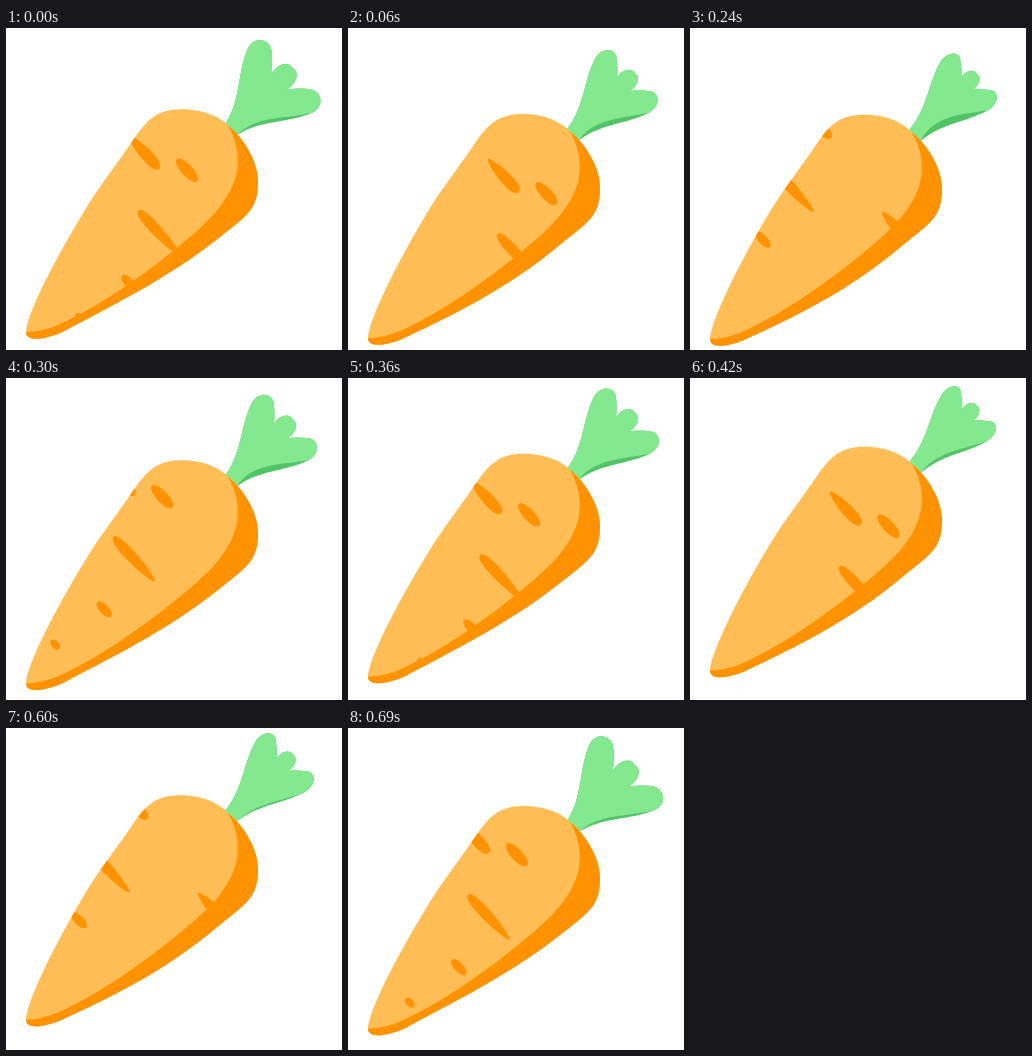
Write an HTML page with a canvas that moves like this. It is 336 px wide and 322 px high and loops after 720 ms.

```html
<!DOCTYPE html>
<html lang="en">
<head>
<meta charset="utf-8">
<title>Spinning carrot</title>
<style>
html, body { margin: 0; width: 100%; height: 100%; overflow: hidden; background: #fff; }
canvas { display: block; }
</style>
</head>
<body>
<canvas id="stage" width="336" height="322"></canvas>
<script>
const ctx = document.getElementById('stage').getContext('2d');
const { sin, cos, max, PI, SQRT1_2 } = Math;
const LOOP = 720, STEP = 30, SPIN = 360;
const ORANGE = '#ffbd55', SHADE = '#ff9200', LEAF = '#84e88f', LEAF_SHADE = '#51c465';

// Centre, length, fullness at the upper and the lower end
const MARKS = [
  { x: 88, y: 74, len: 45, top: 4, end: 11 },
  { x: 131, y: 92, len: 30, top: 7, end: 8 },
  { x: 103, y: 154.5, len: 61, top: 10, end: 4 },
  { x: 73, y: 204.5, len: 20, top: 6, end: 6 },
  { x: 24, y: 240, len: 12, top: 5, end: 5 }
];

// Closed path from a start point followed by cubic curves of three points each
function shape([first, ...rest]) {
  const path = new Path2D();
  path.moveTo(...first);
  for (let i = 0; i < rest.length; i += 3) {
    path.bezierCurveTo(...rest[i], ...rest[i + 1], ...rest[i + 2]);
  }
  path.closePath();
  return path;
}

function fill(path, color) {
  ctx.fillStyle = color;
  ctx.fill(path);
}

// Half a leaf as [along the stalk, across it]; the other half mirrors it
function leafHalf(spread, trim) {
  const notch = 69 + 20 * (1 - spread);
  return [
    [0, 8], [28, 13 - trim], [46, 36 - trim], [70, 45],
    [84, 50], [92, 36], [86, 28],
    [82, 22], [notch + 6, 16], [notch, 11],
    [82, 14], [90, 7], [88, 0]
  ];
}

function leafShape(spread, trim, lift) {
  const upper = leafHalf(spread, 0).map(([a, p]) => [a, -p]);
  const lower = leafHalf(spread, trim).reverse().slice(1);
  return shape([...upper, ...lower].map(([a, p]) => {
    const root = max(0, 1 - a / 30);
    const q = p * (spread + (1 - spread) * root);
    return [224.5 + (a + q) * SQRT1_2, 102 - lift + (q - a) * SQRT1_2];
  }));
}

function drawLeaf(spread, depth, lift) {
  fill(leafShape(spread, 0, lift), LEAF_SHADE);
  fill(leafShape(spread, depth * 1.4 / spread, lift), LEAF);
}

function bodyShape(swell) {
  const up = 2.5 * swell, down = 2.5 * swell;
  return shape([
    [20, 304], [22, 280], [60, 212 - up], [85, 172 - up],
    [100, 149 - up], [115, 130 - up], [127, 112 - up],
    [140, 93 - up], [150, 81 - swell], [175, 81 - swell],
    [200, 81 - swell], [215, 90], [222, 97],
    [240, 112], [252, 135], [252, 153],
    [252, 180], [243, 186], [215, 208],
    [160, 252 + down], [100, 280 + down], [60, 302],
    [40, 312], [20, 314], [20, 304]
  ]);
}

const shadow = shape([
  [20, 304], [40, 303], [52, 297], [62, 292],
  [112, 268], [170, 222], [196, 198],
  [222, 174], [246, 140], [222, 97],
  [340, 150], [250, 330], [10, 330]
]);

function drawMark({ x, y, len, top, end }, shift) {
  const r = len / 2;
  ctx.save();
  ctx.translate(x + shift, y + shift);
  ctx.rotate(.82);
  fill(shape([[-r, 0], [-r, -top], [r, -end], [r, 0], [r, end], [-r, top], [-r, 0]]), SHADE);
  ctx.restore();
}

// Marks slow down as they roll towards the shaded side
const roll = u => u < 120 ? u * .42 : 50 + (u - 120) * .29;

function drawBody(t, swell) {
  const body = bodyShape(swell);
  const u = (t + 120) % SPIN;
  fill(body, ORANGE);
  ctx.save();
  ctx.clip(body);
  fill(shadow, SHADE);
  for (const turn of [0, SPIN]) {
    for (const mark of MARKS) drawMark(mark, roll(u + turn));
  }
  ctx.restore();
}

function draw(t) {
  const a = t / LOOP * 2 * PI;
  const bob = 13 * sin(a + .21) - 2.5;
  const swell = 1.33 - 1.45 * cos(2 * a + .41);
  const spread = .775 + .195 * cos(2 * a + .48) + .065 * cos(a - .28);
  const depth = max(0, 4.7 + 3 * sin(a - .2));
  ctx.fillStyle = '#fff';
  ctx.fillRect(0, 0, 336, 322);
  ctx.save();
  ctx.translate(0, bob);
  drawLeaf(spread, depth, swell * .8);
  drawBody(t, swell);
  ctx.restore();
}

const start = performance.now();
function tick() {
  const t = (performance.now() - start) % LOOP;
  draw(Math.floor(t / STEP) * STEP);
  requestAnimationFrame(tick);
}
tick();
</script>
</body>
</html>
```
